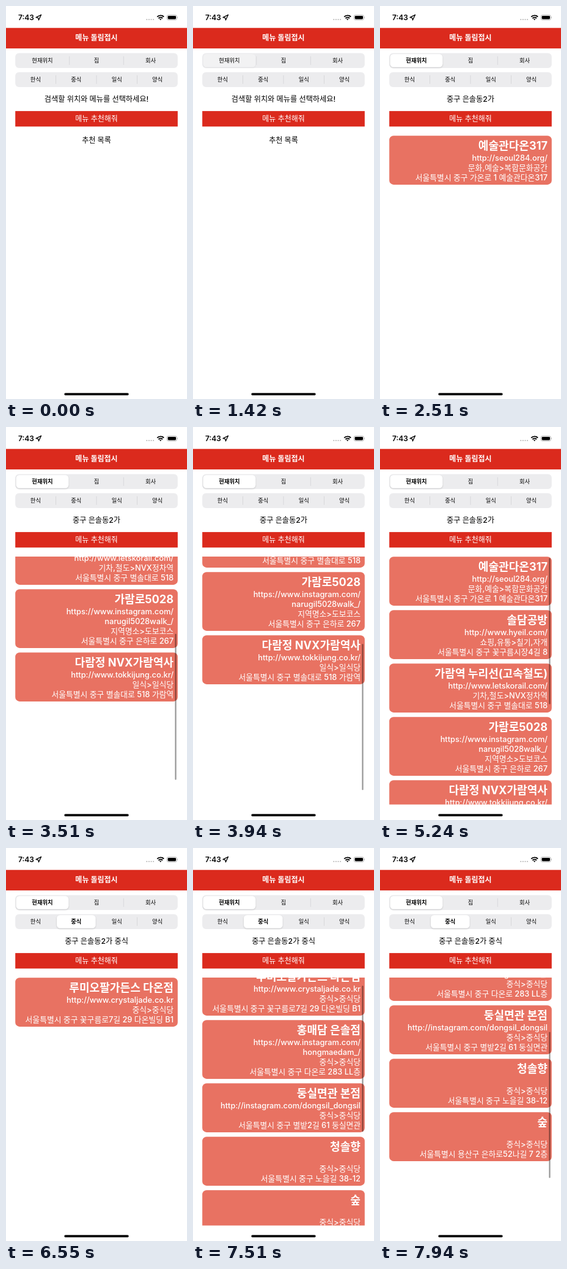
Animation of 296x640 px, one loop 8000 ms. Source, as an HTML page:

```html
<!DOCTYPE html>
<html lang="ko">
<head>
<meta charset="utf-8">
<style>
  html, body { margin: 0; width: 100%; height: 100%; overflow: hidden; background: #fff; }
  svg { display: block; width: 296px; height: 640px; }
  text { font-family: Inter, "Noto Sans CJK KR", "Noto Sans CJK", sans-serif; }
</style>
</head>
<body>
<svg id="stage" viewBox="0 0 296 640">
  <defs>
    <clipPath id="view"><rect x="15" y="211" width="266" height="403.7"/></clipPath>
    <filter id="lift" x="-10%" y="-20%" width="120%" height="150%">
      <feDropShadow dx="0" dy="1" stdDeviation="1.2" flood-opacity=".2"/>
    </filter>
  </defs>
  <path d="M49 18.6 57.6 14.3 53.4 23 52.7 19.3Z" fill="none" stroke="#000" stroke-width="1.3" stroke-linejoin="round"/>
  <path d="M230.3 22h13" stroke="#bbb" stroke-width="2.2" stroke-linecap="round" stroke-dasharray="0 3.6"/>
  <g fill="none" stroke="#000" stroke-width="1.9">
    <path d="M247.2 17.6a7.8 7.8 0 0 1 11 0M249.4 20a4.7 4.7 0 0 1 6.6 0"/>
    <path d="M251.4 21.4h2.6l-1.3 1.3z" stroke-width="1"/>
  </g>
  <rect x="263.2" y="14.6" width="16.2" height="8.2" rx="2.6" fill="none" stroke="#a6a6a6" stroke-width=".8"/>
  <rect x="264.6" y="16" width="13.4" height="5.4" rx="1.4"/>
  <path d="M280.4 17.2q1.6 1.5 0 3z" fill="#a6a6a6"/>
  <rect y="35.7" width="296" height="33.4" fill="#db2a1d"/>
  <rect x="15.2" y="171.1" width="265.6" height="25.2" fill="#db2a1d"/>
  <rect x="95.3" y="630.2" width="105.4" height="3.8" rx="1.9"/>
</svg>
<script>
const stage = document.getElementById('stage');
const LEFT = 15.2, WIDTH = 265.6;

function add(parent, tag, attrs, content = '') {
  const el = document.createElementNS('http://www.w3.org/2000/svg', tag);
  for (const key in attrs) el.setAttribute(key, attrs[key]);
  el.textContent = content;
  parent.append(el);
  return el;
}

// Text centred vertically on y
function label(parent, x, y, size, content, attrs = {}) {
  return add(parent, 'text', {
    x, y: y + size * 0.37, 'font-size': size, 'text-anchor': 'middle', 'font-weight': 500, ...attrs
  }, content);
}

function segmented(y, names, selected) {
  const width = WIDTH / names.length;
  add(stage, 'rect', { x: LEFT, y, width: WIDTH, height: 24.2, rx: 6, fill: '#ececee' });
  const hidden = [];
  names.slice(1).forEach((_, i) => {
    const line = add(stage, 'rect', {
      x: LEFT - 0.4 + width * (i + 1), y: y + 5, width: 0.8, height: 14, fill: '#d2d2d5'
    });
    if (i === selected || i === selected - 1) hidden.push(line);
  });
  const pill = add(stage, 'rect', {
    x: LEFT + 1.5 + width * selected, y: y + 1.5, width: width - 3, height: 21.2, rx: 5.2,
    fill: '#fff', filter: 'url(#lift)'
  });
  const texts = names.map((name, i) => label(stage, LEFT + width * (i + 0.5), y + 12, 9.3, name));
  return amount => {
    pill.setAttribute('opacity', amount);
    hidden.forEach(line => line.setAttribute('opacity', 1 - amount));
    texts[selected].setAttribute('font-weight', amount > 0.5 ? 700 : 500);
  };
}

label(stage, 33, 19, 12, '7:43', { 'font-weight': 600 });
label(stage, 148, 52, 12, '메뉴 돌림접시', { fill: '#fff', 'font-weight': 600 });
label(stage, 148, 184, 12, '메뉴 추천해줘', { fill: '#fff', 'font-weight': 400 });
const selectPlace = segmented(76.8, ['현재위치', '집', '회사'], 0);
const selectFood = segmented(107.8, ['한식', '중식', '일식', '양식'], 1);
const query = label(stage, 148, 151, 12.2, '');
const placeholder = label(stage, 148, 219, 12.1, '추천 목록');
const view = add(stage, 'g', { 'clip-path': 'url(#view)' });
const thumb = add(stage, 'rect', { x: 276.3, width: 2.3, rx: 1.15, fill: '#000' });

// Each row: title, address of the site (a space breaks the line), category, place
function buildList(rows) {
  const list = add(view, 'g', {});
  let top = 211.2;
  for (const [title, url, kind, place] of rows) {
    const lines = [...url.split(' '), kind, place];
    const height = 31.7 + lines.length * 16;
    const card = add(list, 'g', { fill: '#fff' });
    add(card, 'rect', { x: LEFT, y: top, width: WIDTH, height, rx: 7, fill: '#e87262' });
    label(card, 274, top + 15.8, 18.1, title, { 'text-anchor': 'end', 'font-weight': 700 });
    lines.forEach((line, i) =>
      label(card, 274, top + 35.8 + i * 16, 12.8, line, { 'text-anchor': 'end' }));
    top += height + 7.3;
  }
  return list;
}

const nearby = buildList([
  ['예술관다온317', 'http://seoul284.org/', '문화,예술>복합문화공간', '서울특별시 중구 가온로 1 예술관다온317'],
  ['솔담공방', 'http://www.hyeil.com/', '쇼핑,유통>칠기,자개', '서울특별시 중구 꽃구름시장4길 8'],
  ['가람역 누리선(고속철도)', 'http://www.letskorail.com/', '기차,철도>NVX정차역', '서울특별시 중구 별솔대로 518'],
  ['가람로5028', 'https://www.instagram.com/ narugil5028walk_/', '지역명소>도보코스', '서울특별시 중구 은하로 267'],
  ['다람정 NVX가람역사', 'http://www.tokkijung.co.kr/', '일식>일식당', '서울특별시 중구 별솔대로 518 가람역']
]);
const chinese = buildList([
  ['루미오팔가든스 다온점', 'http://www.crystaljade.co.kr', '중식>중식당', '서울특별시 중구 꽃구름로7길 29 다온빌딩 B1'],
  ['홍매담 은솔점', 'https://www.instagram.com/ hongmaedam_/', '중식>중식당', '서울특별시 중구 다온로 283 LL층'],
  ['둥실면관 본점', 'http://instagram.com/dongsil_dongsil', '중식>중식당', '서울특별시 중구 별밭2길 61 둥실면관'],
  ['청솔향', '', '중식>중식당', '서울특별시 중구 노을길 38-12'],
  ['숲', '', '중식>중식당', '서울특별시 용산구 은하로52나길 7 2층']
]);

// Scroll offsets, one per 110 ms
const nearbyScroll = [0, 92, 208, 258, 276, 268, 236, 168, 72, -15.4, -9, -4, -1];
const chineseScroll = [0, 18, 52, 90, 122, 145];

function sample(offsets, time) {
  const i = Math.floor(time / 110);
  return offsets[Math.max(0, Math.min(offsets.length - 1, i))];
}

function showList(list, visible, all, offset) {
  list.setAttribute('display', visible ? 'inline' : 'none');
  list.setAttribute('transform', `translate(0 ${-offset})`);
  [...list.children].forEach((card, i) =>
    card.setAttribute('display', all || i === 0 ? 'inline' : 'none'));
}

// Value of the last [time, value] pair that has begun
const at = (t, ...pairs) => pairs.filter(pair => t >= pair[0]).pop()[1];

function draw(t) {
  selectPlace(at(t, [0, 0], [1420, 0.35], [1530, 0.8], [1650, 1]));
  selectFood(at(t, [0, 0], [5350, 0.35], [5460, 0.8], [5580, 1]));
  query.textContent = at(t, [0, '검색할 위치와 메뉴를 선택하세요!'],
    [1650, '중구 은솔동2가'], [5580, '중구 은솔동2가 중식']);
  placeholder.setAttribute('display', t < 2510 ? 'inline' : 'none');

  const offset = t < 5240 ? sample(nearbyScroll, t - 3270) : sample(chineseScroll, t - 7390);
  showList(nearby, t >= 2510 && t < 5580, t >= 3270, offset);
  showList(chinese, t >= 6550, t >= 7390, offset);

  thumb.setAttribute('y', 213.6 + Math.max(0, offset) * 0.592);
  thumb.setAttribute('height', 238 + Math.min(0, offset));
  thumb.setAttribute('opacity', at(t, [0, 0], [3380, 0.4], [5800, 0.18], [5900, 0], [7500, 0.4]));
}

function frame() {
  draw(performance.now() % 8000);
  requestAnimationFrame(frame);
}
frame();
</script>
</body>
</html>
```
